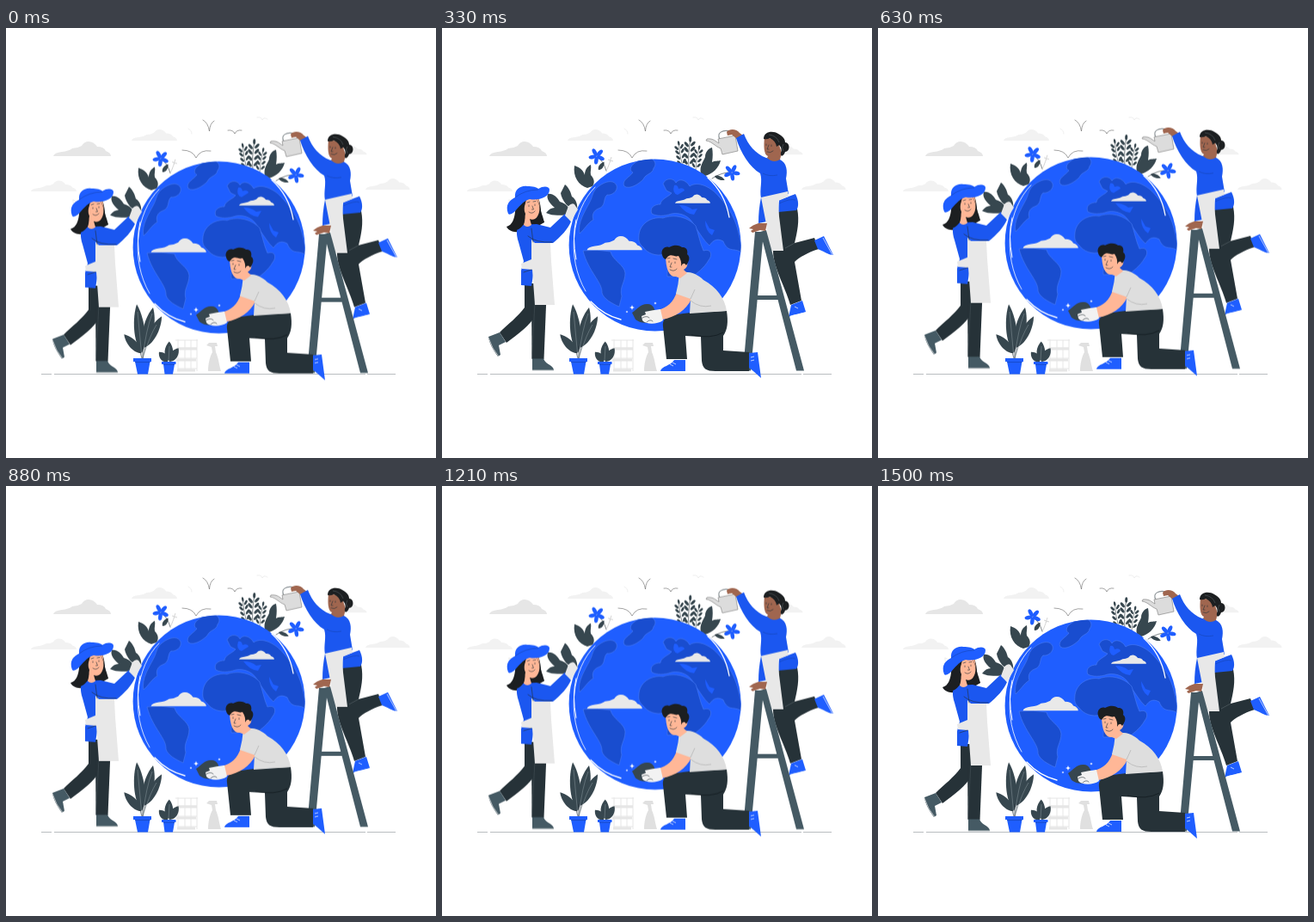
Write an HTML page without scripts that moves like this. It is 500x500 px and loops after 1540 ms.

```html
<!DOCTYPE html>
<html lang="en">
<head>
<meta charset="utf-8">
<title>Caring for the planet</title>
<style>
  html, body { margin: 0; width: 100%; height: 100%; overflow: hidden; background: #fff; }
  svg { display: block; width: 100%; height: 100%; }
  .float { animation: float 1540ms linear infinite; }
  @keyframes float {
    0%, 100% { transform: translateY(-.4px); }
    48.7% { transform: translateY(-6.3px); }
    97.4% { transform: translateY(0); }
  }
  .blue { fill: #1f5eff; }
  .top { fill: #1b57f0; }
  .land { fill: #194dcf; stroke: #4a7df5; stroke-width: .6; }
  .dark { fill: #263238; }
  .slate { fill: #455a64; }
  .leaf { fill: #37474f; }
  .hair { fill: #1c1f21; }
  .pale { fill: #e8e8e8; }
  .skin { fill: #ffb797; }
  .brown { fill: #a0664f; }
  .line { fill: none; stroke: #263238; stroke-width: .6; stroke-linecap: round; }
  .shine { fill: none; stroke: #fff; stroke-width: 1.3; stroke-linecap: round; }
</style>
</head>
<body>
<svg viewBox="0 0 500 500">
  <defs>
    <path id="cloud" d="M0 17Q1 13 10 12Q18 11 22 8Q28 8 33 5Q36 0 41 0Q47 0 51 6Q59 6 61 11Q67 13 67 17Z"/>
    <path id="leaf" d="M0 0C-9-7-7-22 0-30C7-22 9-7 0 0Z"/>
    <g id="sprig">
      <path class="line" d="M0 0Q-2-14 0-31"/>
      <g class="leaf">
        <ellipse cy="-32" rx="1.5" ry="3.2"/>
        <g id="pair">
          <ellipse cx="-4" cy="-6" rx="1.6" ry="3.5" transform="rotate(-40 -4 -6)"/>
          <ellipse cx="3.400" cy="-7" rx="1.600" ry="3.500" transform="rotate(40 3.400 -7)"/>
        </g>
        <use href="#pair" y="-7"/>
        <use href="#pair" y="-14"/>
        <use href="#pair" y="-20"/>
      </g>
    </g>
    <g id="flower" class="blue">
      <ellipse id="petal" cx="5" rx="4.600" ry="2.300"/>
      <use href="#petal" transform="rotate(72)"/>
      <use href="#petal" transform="rotate(144)"/>
      <use href="#petal" transform="rotate(216)"/>
      <use href="#petal" transform="rotate(288)"/>
    </g>
    <path id="spark" d="M0-3L.8-.8L3 0L.8 .8L0 3L-.8 .8L-3 0L-.8-.8Z" fill="#fff"/>
    <clipPath id="disc"><circle cx="247.600" cy="255.500" r="100"/></clipPath>
  </defs>

  <!-- Sky -->
  <use href="#cloud" x="55" y="132" fill="#e6e6e6"/>
  <g fill="#f2f2f2">
    <use href="#cloud" transform="translate(146 118) scale(.79 .76)"/>
    <use href="#cloud" transform="translate(29 177.5) scale(.79 .73)"/>
    <use href="#cloud" transform="translate(418 175) scale(.77 .76)"/>
    <use href="#cloud" transform="translate(374 137) scale(.68 .6)"/>
  </g>
  <g class="line">
    <path stroke="#666" d="M229 107Q235 110 236.500 120Q237 111 242 108M258 119Q264 118 266 123Q268 118 274 119M205 142Q217 142 221 151Q226 141 238 143"/>
    <path stroke="#e2e2e2" d="M292 104Q297 103 298 107Q300 103 304 106M212 117Q216 119 216 123M78 200q5 1 4 5q-5 0-4-5M77 206q4-2 6 1"/>
  </g>

  <!-- Ground -->
  <path d="M41 402.500H53M56 402.500H418M420 402.500H453" stroke="#a7adb0" stroke-width=".8"/>
  <g fill="none" stroke="#e6e6e6" stroke-width="1">
    <path d="M200 362V399M222 362V399M208 363V398M215 363V398M197 363H223M200 372H222M200 384H222M200 396H222"/>
    <path stroke-width="3" d="M198 373H222M198 386H221M199 398H220"/>
  </g>
  <path fill="#e0e0e0" d="M233 369L236 366H245L246 370H243L244 377C247 383 248 393 250 399H235C235 391 237 382 240 377L239 371Z"/>
  <g class="leaf">
    <use href="#leaf" transform="translate(158 378) rotate(-6) scale(1 1.900)"/>
    <use href="#leaf" transform="translate(161 372) rotate(12) scale(1 1.600)"/>
    <use href="#leaf" transform="translate(162 371) rotate(28) scale(.85 1.350)"/>
    <use href="#leaf" transform="translate(157 378) rotate(-42) scale(.8 .98)"/>
    <use href="#leaf" transform="translate(189 387) rotate(2) scale(.8 .75)"/>
    <use href="#leaf" transform="translate(190 388) rotate(34) scale(.75 .63)"/>
    <use href="#leaf" transform="translate(188 388) rotate(-42) scale(.7 .5)"/>
  </g>
  <path class="line" d="M159 384V370M159 384L163 368M158 384L156 377"/>
  <path fill="none" stroke="#8b999f" stroke-width=".5" d="M158 383L153 330M159 383Q163 350 170 332M160 381Q168 356 175 345M189 387L190 370"/>
  <path class="blue" d="M148 384H169V388H167.500L165 402.500H153L150 388H148ZM181 388H197.500V391H196L194 402.500H184.500L183 391H181Z"/>
  <path d="M150 388.500H167.500M183 391.300H196" stroke="#1748bd" stroke-width=".8"/>

  <g class="float">
    <!-- Foliage behind the globe -->
    <use href="#sprig" transform="translate(280 164) rotate(-10) scale(.86)"/>
    <use href="#sprig" transform="translate(287 165) rotate(3) scale(1.02)"/>
    <use href="#sprig" transform="translate(295 168) rotate(9) scale(.82)"/>
    <g class="leaf">
      <path d="M301 172C299 164 304 158 306 153C306 147 310 143 314 142C315 147 315 153 314 159C317 157 321 158 324 157C322 166 314 173 306 175Z"/>
      <use href="#leaf" transform="translate(317 175) rotate(112) scale(.35 .42)"/>
      <use href="#leaf" transform="translate(182 168) rotate(35) scale(.4 .38)"/>
      <path d="M169 189C159 186 152 176 154 163C161 165 165 170 166 174C166 168 169 164 173 162C174 166 172 170 173 174C177 178 178 183 175 187Z"/>
    </g>
    <path class="line" d="M337 171Q326 170 314 178M180 152Q188 158 191 169"/>
    <path fill="none" stroke="#d4d4d4" d="M196 157L191 170M193 156l6 2M197 153l-2 6"/>
    <use href="#flower" transform="translate(337 171) rotate(10)"/>
    <use href="#flower" transform="translate(180 152) rotate(25)"/>

    <!-- Globe -->
    <circle class="blue" cx="247.600" cy="255.500" r="100"/>
    <g clip-path="url(#disc)">
      <g class="land">
        <path d="M212 187C208 180 219 176 222 171C215 167 222 159 234 155C246 152 251 160 246 166C245 173 237 172 234 179C228 185 218 191 212 187Z"/>
        <path d="M203 186C205 193 197 198 192 197C187 201 191 210 182 213C176 215 174 221 176 226C170 229 165 238 160 242C157 230 167 215 172 205C176 198 174 191 187 184C193 181 200 180 203 186Z"/>
        <path d="M164 262Q181 260 196 263C198 273 212 278 213 288C213 299 206 304 209 315L206 327C197 323 188 318 186 311C187 299 170 286 164 262Z"/>
        <path d="M257 184C261 176 270 178 272 183C276 177 284 180 288 187C298 180 314 189 322 199C338 216 346 235 349 265C341 257 333 266 327 251C318 246 314 252 311 256C304 250 299 240 294 234C289 222 278 217 267 219C258 222 250 222 244 219C241 212 247 208 254 208C254 202 264 199 267 195L261 192Z"/>
        <path d="M229 243C231 229 245 222 257 224C270 219 286 223 295 233C298 242 300 253 304 262C313 259 315 267 310 273C305 282 296 288 292 292L262 292C261 282 267 272 259 266C249 269 239 265 234 258C227 252 229 247 229 243Z"/>
      </g>
      <path class="blue" d="M270 186q4-1 5 4q6-2 7 2l-8 5q-7-2-4-11M276 209q9 0 15 5l6-1l-4 7q-10-1-17-11M306 227l5 9l6 2l-3 6q-8-5-8-17"/>
    </g>
    <g class="shine">
      <path stroke-width=".8" d="M178 188C151 215 144 270 167 309"/>
      <path d="M173 321Q188 337 208 342M309 177Q329 195 334 223"/>
      <path stroke-width="1" d="M156 226Q151 246 156 272"/>
    </g>
    <g fill="#e9e9e9">
      <use href="#cloud" transform="translate(168.500 245) scale(.96)"/>
      <use href="#cloud" transform="translate(271 196.500) scale(.61 .6)"/>
    </g>

    <!-- Gardener on the left -->
    <g class="leaf">
      <path d="M157 215C147 214 139 203 138 195L143 185C148 189 150 195 151 199C156 202 158 209 157 215Z"/>
      <path d="M151 221C141 219 131 223 121 218C124 214 127 212 131 212C125 207 121 201 123 196C129 195 134 200 137 205C145 207 149 213 151 221Z"/>
    </g>
    <path class="dark" d="M96 300H112L110 335C103 349 88 359 75 369L67 357C77 347 88 339 96 328Z"/>
    <path class="dark" d="M104 301H122L118.500 388H104.500Z"/>
    <path d="M108 322L104.500 387" stroke="#4b575c" stroke-width=".5"/>
    <path class="slate" d="M67 357L74 368L66 372L68 383L65 385C60 378 55 370 54 362ZM105 387.500H118C121 395 130 395 130 401H105Z"/>
    <path d="M105 401H130M54 363Q58 376 66 385" stroke="#b9c0c3" fill="none"/>
    <path class="hair" d="M97 198C87 202 86 210 85 217C84 225 82 232 75 234C79 242 92 242 97 235C105 240 111 233 119 229C113 221 117 209 111 199Z"/>
    <path class="top" d="M91 232C86 234 86 243 89 252L95 274L92 285L92 302L104 303L112 253H129C138 246 147 236 150 228L143 219L126 235L110 231Z"/>
    <path class="skin" d="M97 205C99 200 107 200 112 201C115 209 114 222 108 225C106 226 104 226 102 225L104 232Q99 236 95 232L97 219Q94 212 97 205Z"/>
    <path class="hair" d="M98 199C98 209 93 213 96 221C98 229 93 238 82 239C87 228 83 216 89 204ZM109 200C114 206 114 215 117 222L119 229C110 230 111 223 114 217Q114 208 109 200Z"/>
    <path class="blue" d="M77 219C73 208 79 203 85 200C84 191 91 186 99 187C106 187 110 188 112 190C118 186 125 187 125 191C125 200 112 204 102 202C94 204 89 212 84 217Q79 221 77 219Z"/>
    <path fill="none" stroke="#1748bd" stroke-width=".7" d="M85 200Q97 191 112 191"/>
    <path class="pale" d="M104 249L108 253H126L127 274L131 325H108L105 284L93 283L92 277L104 272Z"/>
    <path class="line" d="M104 236L106 252M100 245Q109 253 128 252M95 287L104 284"/>
    <path class="pale" d="M143 221L147 210Q151 206 154 208L158 214L150 228Z"/>
    <path class="line" d="M101 209v1.500M108 208v1.500M99 206l3-1M106 205l3-.5M105 210l1.500 4h-2M101 217q4 3 7-1"/>

    <!-- Ladder and climber -->
    <path fill="none" d="M323 132C319 125 326 121 335 123" stroke="#8d9498" stroke-width="1.200"/>
    <path fill="#dcdcdc" stroke="#777" stroke-width=".6" d="M321 132L341 128L344 146L326 150L324 143C318 141 314 135 307 134L308 132C316 131 318 135 322 137Z"/>
    <path class="brown" d="M331 124C335 119 343 121 346 125L350 128L343 132L337 127L332 128Z"/>
    <path class="dark" d="M390 215L413 213C416 228 413 240 410 253L433 247L438 260C425 264 415 270 410 275L418 320L405 325C399 303 384 280 385 260Z"/>
    <path d="M410 253L399 259" stroke="#59666b" stroke-width=".6"/>
    <path class="blue" d="M433 250L444 245L455 267C449 267 443 262 437 260ZM406 325L419 320L423 333C418 335 409 336 403 339Z"/>
    <path stroke="#fff" stroke-width=".7" d="M443 247L454 267M405 338Q414 336 422 334M410 327l4 2" fill="none"/>
    <path class="top" d="M371 200L378 200L378 228L368 230Q368 214 371 200ZM392 203L411 196C415 204 415 211 412 215L391 217Z"/>
    <path class="top" d="M342 131L351 126C356 139 364 149 377 154L393 156C401 160 402 169 400 178L403 196L371 201C369 190 373 181 370 172C358 165 347 148 342 131Z"/>
    <path fill="none" stroke="#1748bd" stroke-width=".7" d="M373 172Q380 176 390 174M392 207Q405 201 411 203"/>
    <path class="brown" d="M375 130L390 133L395 148L393 156Q385 161 378 154L379 152C374 150 374 140 375 130Z"/>
    <path class="hair" d="M374 132C374 123 385 122 391 126C397 129 399 133 399 136C405 136 405 147 399 147C397 153 393 153 394 148Q396 143 392 139L389 141Q388 134 381 131Q378 133 374 132Z"/>
    <path fill="none" stroke="#606a6e" stroke-width=".5" d="M380 127q9 1 12 9M397 138q-3 4 0 8"/>
    <path class="line" d="M377 138v1.500M383 139v1.500M380 139l-2 5h2M378 147q4 2 7-1"/>
    <path class="pale" d="M371 200L402 193L403 199L391 204L392 222L397 262H381L377 231Z"/>
    <path class="slate" d="M364 240H374L359 401.500H350ZM370 240L377 238L421 401.500H412ZM363 314H393L395 319H363Z"/>
    <path class="brown" d="M368 230H378L376 239L370 238L361 241L359 239L362 237L357 236Q361 232 368 230Z"/>

    <!-- Kneeling cleaner -->
    <path class="leaf" d="M221 334C227 330 231 324 238 324C245 323 247 329 248 333L246 345C238 345 233 348 225 342Z"/>
    <use href="#spark" x="221" y="328"/>
    <use href="#spark" transform="translate(248 323) scale(.6)"/>
    <use href="#spark" transform="translate(215 333) scale(.5)"/>
    <path class="dark" d="M331 332C333 345 332 354 327 361V378L357 380V402H318C307 402 303 399 302 390L301 362L283 361L285 388H261L257 350C256 338 265 337 289 334Z"/>
    <path d="M290 360Q313 365 327 357" fill="none" stroke="#11191d" stroke-width=".7"/>
    <path class="blue" d="M270 389H283V402H254C255 396 266 396 270 389ZM357 381L367 380L371 410L362 402L357 398Z"/>
    <path stroke="#fff" stroke-width=".7" d="M268 392l4 2M265 394l4 2M359 386l4-1M359 390l4-1"/>
    <path class="skin" d="M273 310L290 318C284 331 272 339 256 342L251 331C262 328 269 322 273 310Z"/>
    <path fill="#f2f2f2" d="M254 330L257 343C250 348 237 348 233 343L232 338L237 336L236 333Q245 331 254 330Z"/>
    <path class="line" d="M233 340q5-3 8 0M238 345q4-4 7-1"/>
    <path fill="#dedede" d="M276 288C285 285 296 288 304 296C319 304 329 317 331 332L288 335L289 318L272 312Q275 301 276 288Z"/>
    <path fill="none" stroke="#aaa" stroke-width=".6" d="M294 307L289 318M289 320Q300 329 313 326"/>
    <path class="skin" d="M260 266L276 267L279 273C286 272 288 280 281 284L285 288L277 294L272 292C265 293 260 285 260 266Z"/>
    <path class="hair" d="M256 267C254 261 259 256 264 258C271 254 277 256 279 258C285 257 286 263 285 266C290 270 286 276 284 279Q281 274 278 280Q279 274 275 268C269 270 266 263 260 272Q257 271 256 267Z"/>
    <path class="line" d="M264 274v1.500M271 275v1.500M262 271l3-.5M269 271l4 1M267 276l-2 5h2M265 284q5 3 8-1"/>
  </g>
</svg>
</body>
</html>
```
